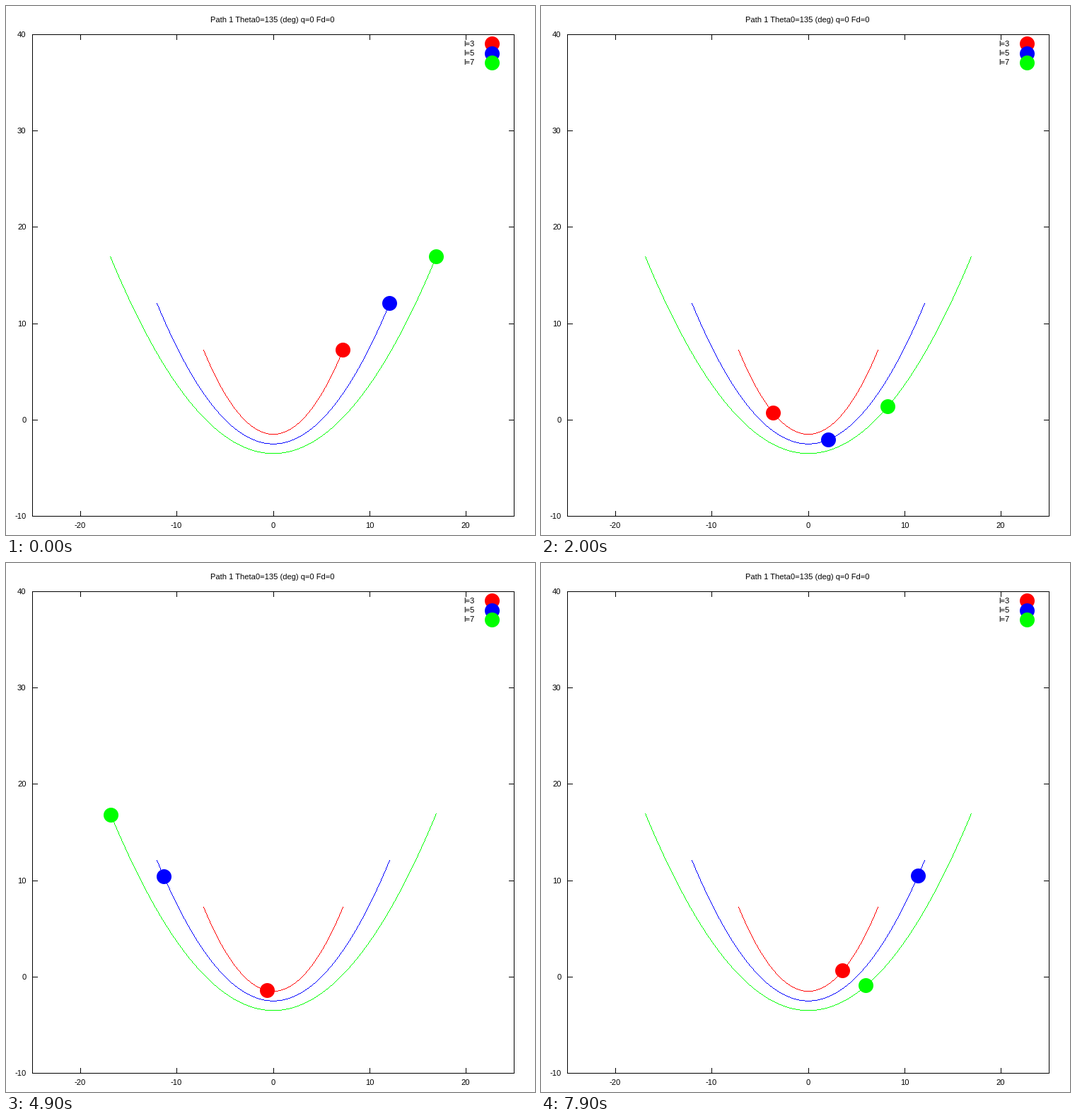
A matplotlib script that plays this animation: 748 by 748 pixels, repeating every 8 s.

```python
import numpy as np
import matplotlib.pyplot as plt
from matplotlib.animation import FuncAnimation
from matplotlib.collections import PolyCollection
from matplotlib.patches import Circle

SIZE, DPI = 748, 100
FRAMES, INTERVAL = 80, 100
G = 9.8
THETA0 = np.radians(135)
U0 = np.sin(THETA0) / (1 + np.cos(THETA0))  # starting x / l

LEFT, RIGHT, TOP, BOTTOM = 37, 718, 40, 721
SCALE = (RIGHT - LEFT) / 50
X0, Y0 = 377.5, 584.6
TICK = 7
BEADS = [(3, "#ff0000", 53), (5, "#0000ff", 67), (7, "#00ff00", 80)]

plt.rcParams["font.family"] = "Liberation Sans"
plt.rcParams["font.size"] = 8
plt.rcParams["text.hinting"] = "native"

fig = plt.figure(figsize=(SIZE / DPI, SIZE / DPI), dpi=DPI, facecolor="white")
ax = fig.add_axes([0, 0, 1, 1])
ax.set_xlim(0, SIZE)
ax.set_ylim(SIZE, 0)
ax.axis("off")


def to_px(x, l):
    """Pixel position of the point x on the parabola with parameter l."""
    y = x**2 / (2 * l) - l / 2
    return X0 + SCALE * x, Y0 - SCALE * y


def boxes(corners, color, z=1):
    """Crisp boxes, each given as its first and last pixel."""
    verts = [[(a, b), (c + 1, b), (c + 1, d + 1), (a, d + 1)]
             for a, b, c, d in corners]
    ax.add_collection(PolyCollection(verts, facecolors=color, linewidths=0,
                                     edgecolors="none", antialiaseds=False,
                                     snap=False, zorder=z), autolim=False)


def curve(l, color, z):
    """One-pixel parabola: one pixel per column if flat, per row if steep."""
    end, top = to_px(U0 * l, l)
    _, knee = to_px(l, l)  # slope is 1 at x = l
    cols = np.arange(round(X0 - SCALE * l), round(X0 + SCALE * l) + 1)
    _, ys = to_px((cols - X0) / SCALE, l)
    rows = np.arange(round(top), round(knee))
    dx = SCALE * np.sqrt(2 * l * ((Y0 - rows) / SCALE + l / 2))
    xs = np.concatenate([cols, X0 - dx, X0 + dx]).round()
    ys = np.concatenate([ys, rows, rows]).round()
    boxes(zip(xs, ys, xs, ys), color, z)


def label(x, y, text, ha):
    ax.text(x, y, text, ha=ha, va="baseline", color="black")


def dot(x, y, color, z):
    return ax.add_patch(Circle((x + 0.5, y + 0.5), 10.5, fc=color, ec="none",
                               lw=0, zorder=z))


# Frictionless slide: x = l*U0*cos(phi), with time as an integral over phi.
phi = np.linspace(0, 4 * np.pi, 20001)
rate = np.sqrt(1 + (U0 * np.cos(phi))**2)
steps = (rate[1:] + rate[:-1]) / 2 * np.diff(phi)
unit_time = np.concatenate([[0], np.cumsum(steps)])


def bead_x(t, l):
    return l * U0 * np.cos(np.interp(t * np.sqrt(G / l), unit_time, phi))


# Frame, mirrored ticks and labels
rules = [(LEFT, TOP, RIGHT, TOP), (LEFT, BOTTOM, RIGHT, BOTTOM),
         (LEFT, TOP, LEFT, BOTTOM), (RIGHT, TOP, RIGHT, BOTTOM)]
for v in range(-20, 21, 10):
    x = round(X0 + SCALE * v)
    rules += [(x, BOTTOM - TICK, x, BOTTOM), (x, TOP, x, TOP + TICK)]
    label(x, 738, str(v), "center")
for v in range(-10, 41, 10):
    y = round(BOTTOM - SCALE * (v + 10))
    rules += [(LEFT, y, LEFT + TICK, y), (RIGHT - TICK, y, RIGHT, y)]
    label(28.5, y + 4, str(v), "right")
boxes(rules, "black")
label(377, 23, "Path 1 Theta0=135 (deg) q=0 Fd=0", "center")

# Tracks, legend and beads
dots = []
for i, (l, color, row) in enumerate(BEADS):
    curve(l, color, 2 + i)
    label(662, row + 4 - (i > 0), f"l={l}", "right")
    dot(687, row, color, 6 + i)
    dots.append(dot(0, 0, color, 10 + i))


def update(frame):
    t = frame * INTERVAL / 1000
    for bead, (l, _, _) in zip(dots, BEADS):
        x, y = to_px(bead_x(t, l), l)
        bead.center = (round(x) + 0.5, round(y) + 0.5)
    return dots


anim = FuncAnimation(fig, update, frames=FRAMES, interval=INTERVAL,
                     repeat=True, repeat_delay=0, blit=False)
plt.show()
```
